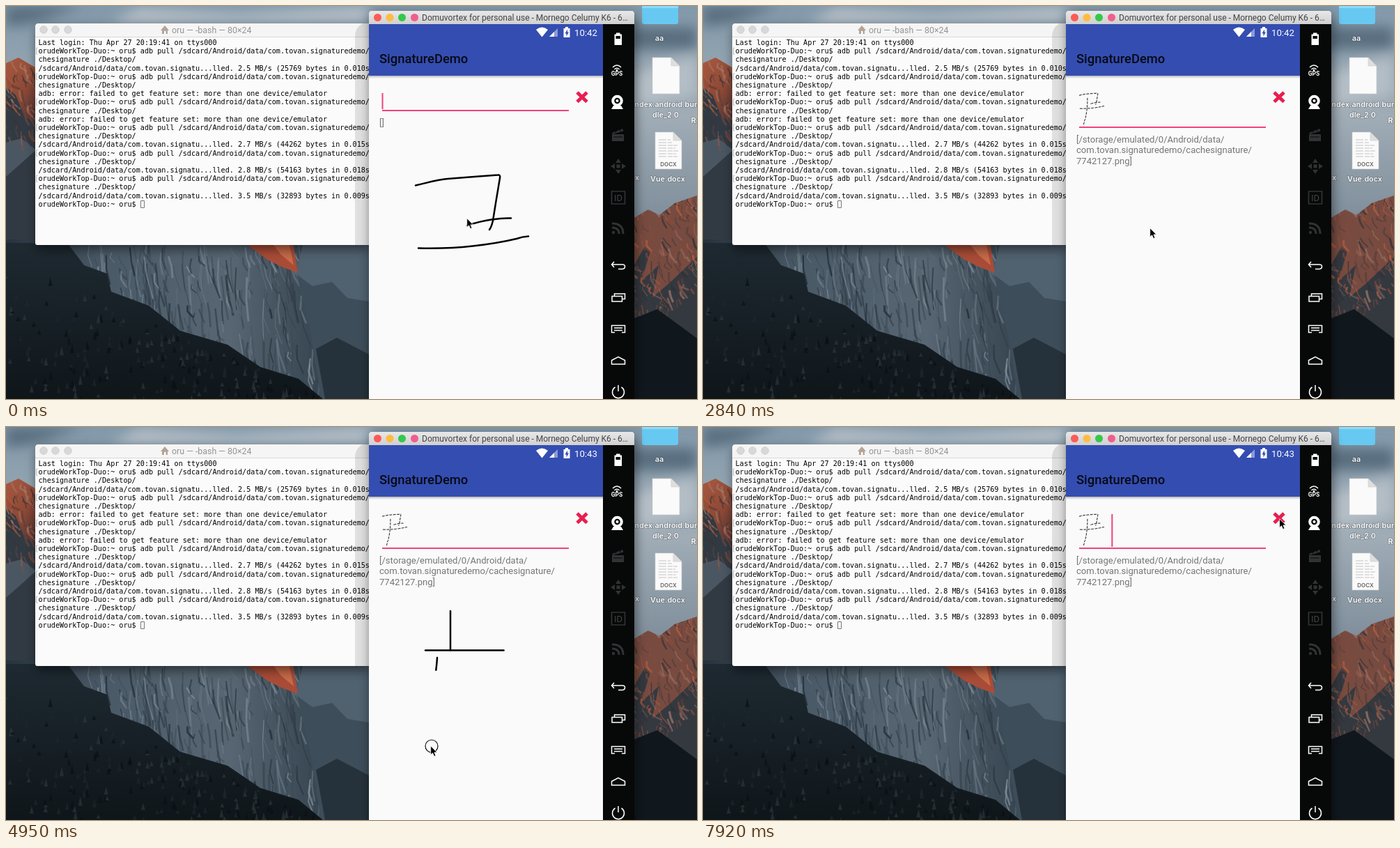
Write an HTML page that moves like this. It is 992 px wide and 564 px high and loops after 8 s.

```html
<!DOCTYPE html>
<html lang="en">
<head>
<meta charset="utf-8">
<title>Handwriting demo</title>
<style>
html, body { margin: 0; width: 100%; height: 100%; overflow: hidden; background: #1b242d; }
svg { display: block; width: 992px; height: 564px; }
text { font-family: Roboto, sans-serif; white-space: pre; }
#terminal text { font: 10.13px "DejaVu Sans Mono", monospace; fill: #000; }
#desktop text { font: 600 10.8px Inter, sans-serif; fill: #fff; text-anchor: middle; paint-order: stroke; stroke: #0005; stroke-width: 1.2px; }
.ink { fill: none; stroke: #000; stroke-width: 2.5; stroke-linecap: round; stroke-linejoin: round; }
.thumb { fill: none; stroke: #000; stroke-width: 4.2; stroke-dasharray: 17 7; }
.line { fill: none; stroke: #fff; stroke-width: 1.5; }
.dim { fill: none; stroke: #303234; stroke-width: 1.7; }
</style>
</head>
<body>
<svg viewBox="0 0 992 564">
<defs>
  <linearGradient id="sky" x2="0" y2="1"><stop stop-color="#8299aa"/><stop offset=".28" stop-color="#a0acb6"/><stop offset=".5" stop-color="#84939f"/><stop offset=".8" stop-color="#5c6b78"/></linearGradient>
  <linearGradient id="cliff"><stop stop-color="#26323d"/><stop offset=".3" stop-color="#4a5966"/><stop offset=".7" stop-color="#576672"/><stop offset="1" stop-color="#35434f"/></linearGradient>
  <linearGradient id="sunlit" x2=".4" y2="1"><stop stop-color="#a9593f"/><stop offset=".55" stop-color="#8c4835"/><stop offset="1" stop-color="#43343a"/></linearGradient>
  <linearGradient id="slope" x2="0" y2="1"><stop stop-color="#1e2931"/><stop offset="1" stop-color="#0f161a"/></linearGradient>
  <linearGradient id="titleBar" x2="0" y2="1"><stop stop-color="#e8e8e8"/><stop offset="1" stop-color="#d0d0d0"/></linearGradient>
  <linearGradient id="fade" x2="0" y2="1"><stop stop-color="#0004"/><stop offset="1" stop-color="#0000"/></linearGradient>
  <filter id="soft" x="-30%" y="-30%" width="160%" height="160%"><feGaussianBlur stdDeviation="9"/></filter>
  <filter id="shadow" x="-10%" y="-10%" width="120%" height="125%"><feDropShadow dy="6" stdDeviation="8" flood-opacity=".5"/></filter>
  <clipPath id="rock"><path d="M105 335H428L416 384 440 460 458 564H150z"/></clipPath>
  <clipPath id="leftRock"><path d="M0 82 18 74 45 90V250H0z"/></clipPath>
  <clipPath id="rightRock"><path d="M900 305 922 292 938 300 960 283 992 272V410L940 452 900 460z"/></clipPath>
  <clipPath id="termClip"><path d="M42 25H521V343H42z"/></clipPath>
  <g id="first">
    <path d="M588 257.5C604 254 617 249.500 634 248S684 244 706 242.500Q710 242 709 247L703 283 699 308Q697 317 694 321"/>
    <path d="M662 315Q680 309 697 306.500T725 304.500"/>
    <path d="M592 347.500Q634 348.500 670 344.500T733 334Q741 331 750 330.500"/>
  </g>
  <path id="down" d="M641.500 275Q642 320 638 355T627 420L621.500 433V438L617 456"/>
  <path id="upright" d="M638 264V320.500"/>
  <path id="across" d="M602 320.500H714.500"/>
  <path id="tail" d="M619 331C618 350 613 375 613 395S612 440 612 460"/>
</defs>

<g id="desktop">
  <path fill="url(#sky)" d="M0 0H992V564H0z"/>
  <g filter="url(#soft)">
    <path fill="#b4bec6" d="M190 2 330 12 520 0 520 24 150 26zM900 96 992 70V128L900 145z"/>
    <path fill="#586d7e" d="M0 0H110L40 24 0 30zM895 30H992V62H895z"/>
  </g>
  <path fill="#4a5763" d="M0 170H45V350H0z"/>
  <path fill="url(#sunlit)" d="M0 82 18 74 45 90V195L24 186 0 192z"/>
  <path fill="#313a43" d="M0 116 14 128 26 158 45 170V208L22 190 0 196zM0 245 45 205V350H0z"/>
  <path fill="#50616f" d="M400 335H525V480H400z"/>
  <path fill="url(#cliff)" d="M105 335H428L416 384 440 460 458 564H0V335z"/>
  <g id="streaks" clip-path="url(#rock)" fill="none"/>
  <path fill="#a94c37" d="M343 340 412 340 419 383 395 374 375 364z"/>
  <path fill="#c76a49" d="M384 343 407 343 413 372 395 357z"/>
  <path fill="#3d4d59" d="M418 386 440 402 468 396 490 419 521 424V564H452L438 475z"/>
  <path fill="url(#slope)" d="M0 340H88L112 372 145 384 151 410 205 430 250 466 318 486 365 518 420 535 455 564H0z"/>
  <path fill="#26323b" d="M445 492 475 476 521 500V564H458z"/>
  <path fill="#784b40" d="M900 305 922 292 938 300 960 283 992 272V410L940 452 900 470z"/>
  <path fill="#343940" d="M900 375 917 345 925 352 912 395 937 372 928 418 952 398 992 360V564H900z"/>
  <g id="rightStreaks" clip-path="url(#rightRock)" fill="none"/>
  <g id="leftStreaks" clip-path="url(#leftRock)" fill="none"/>
  <path fill="#10181e" d="M900 449 935 435 992 477V564H900z"/>
  <g id="trees"/>
  <path fill="#67c9f2" d="M913 0H965V23Q965 26 962 26H916Q913 26 913 23z"/>
  <path fill="#8bdafa" d="M913 0H965V3H913z"/>
  <text x="938" y="50">aa</text>
  <g fill="#fafafa" stroke="#ccc" stroke-width=".6"><path d="M928 74H955L967 86V126H928zM932 181H958L970 193V234H932z"/><path fill="#dedede" d="M955 74V86H967zM958 181V193H970z"/></g>
  <path stroke="#c3c3c3" stroke-dasharray="11 2 7 1" d="M937 192H954M937 196H956M937 200H964M937 204H961M937 208H965M937 212H962M937 216H964"/>
  <text x="951" y="230" style="font-size:8px;fill:#666;stroke:none">DOCX</text>
  <text x="947" y="145">index.android.bun</text>
  <text x="947" y="160">dle_2.0</text>
  <text x="987" y="168">R</text>
  <text x="906" y="250">x</text>
  <text x="950" y="252">Vue.docx</text>
</g>

<g id="terminal">
  <path filter="url(#shadow)" fill="#fbfbfb" d="M42 30Q42 25 47 25H521V343H45Q42 343 42 340z"/>
  <path fill="#f5f5f5" d="M42 30Q42 25 47 25H521V44H42z"/>
  <path stroke="#d9d9d9" d="M42 44.500H521"/>
  <g fill="#d8d8d8" stroke="#c6c6c6" stroke-width=".7"><circle cx="54" cy="34" r="5.300"/><circle cx="71" cy="34" r="5.300"/><circle cx="89" cy="34" r="5.300"/></g>
  <path fill="#b5a497" d="M222 35 228 28 234 35H232V40H224V35z"/><path fill="#fff" d="M227 36H229.500V40H227z"/>
  <text x="238" y="38.500" style="font:12.4px Roboto,sans-serif;fill:#949494">oru — -bash — 80×24</text>
  <g id="lines" clip-path="url(#termClip)"/>
  <path fill="none" stroke="#777" d="M193.500 279.500H198.500V289.500H193.500z"/>
  <path fill="#0000001c" d="M501 44Q501 31 512 25H521V343H501z"/>
</g>

<g id="phone">
  <path filter="url(#shadow)" fill="#fafafa" d="M521 12Q521 7 526 7H897Q902 7 902 12V570H521z"/>
  <path fill="url(#titleBar)" d="M521 12Q521 7 526 7H897Q902 7 902 12V26H521z"/>
  <circle cx="533.500" cy="16.500" r="5.500" fill="#fc5b57"/><circle cx="551" cy="16.500" r="5.500" fill="#fdbc40"/><circle cx="568.500" cy="16.500" r="5.500" fill="#34c84a"/>
  <circle cx="586.500" cy="16.500" r="5.500" fill="#ef5f8d"/>
  <text x="597" y="21" font-size="12" fill="#444">Domuvortex for personal use - Mornego Celumy K6 - 6…</text>
  <path fill="#344db1" d="M521 26H857V100H521z"/>
  <path fill="url(#fade)" d="M521 100H857V104H521z"/>
  <text x="536" y="82" font-size="18.400" font-weight="500" fill="#080a14">SignatureDemo</text>
  <path fill="#fff" d="M761 34Q769.500 27 778 34L769.500 44.500zM800.500 32H803V30H807V32H809.500V45H800.500z"/>
  <path fill="#8d9bd6" d="M780 44 792 32V44z"/><path fill="#fff" d="M780 44 787 37V44z"/>
  <path fill="#344db1" d="M806 33.500 802.500 39.500H804.500V43.500L808 37.500H806z"/>
  <text id="clock" x="816" y="42.500" font-size="13.200" fill="#fff"></text>
  <path stroke="#e91e50" stroke-width="5" d="M820 124 834 137.500M834 124 820 137.500"/>

  <path fill="#070808" d="M857 26H902V564H857z"/>
  <path fill="#fff" d="M876 38.500H881.500V40.500H884V56H873.500V40.500H876z"/><path fill="#070808" d="M875.500 43H882V47H875.500z"/>
  <path class="line" d="M871 88Q877 82 883 88M873.500 91Q877 87.500 880.500 91"/><circle cx="877" cy="92" r="1.200" fill="#fff"/>
  <text x="877" y="100" text-anchor="middle" font-size="8.500" font-weight="700" fill="#fff">GPS</text>
  <circle cx="877.500" cy="136" r="6.300" fill="none" stroke="#fff" stroke-width="4"/><circle cx="877.500" cy="136" r="2" fill="#fff"/><path fill="#fff" d="M872 143H883L886 148H869z"/>
  <path fill="#303234" d="M870 184H887V194H870zM870 182 885 176 886.500 179.500 871 184z"/><path stroke="#070808" d="M875 182 877 177M881 180 883 175M872 188H885"/>
  <path fill="#303234" d="M879 219 883 225H875zM879 241 883 235H875zM868 230 874 226V234zM890 230 884 226V234zM876.500 227.500H881.500V232.500H876.500z"/>
  <path class="dim" d="M869.500 266H888.500V284H869.500z"/><text x="879" y="280" text-anchor="middle" font-size="13" fill="#404244">ID</text>
  <path class="dim" style="stroke-width:3" d="M870 312Q886 312 886 327M870 318Q880 318 880 327"/><circle cx="872" cy="325" r="2.200" fill="#303234"/>
  <path class="line" d="M873 367 869.500 371 873 375M870 371H885Q888.500 371 888.500 374T885 377.500H879"/>
  <path class="line" d="M870 416.500H884.500V424H870zM873.500 416V413H888.500V420.500H885"/>
  <path class="line" d="M874 468.500H869.500V458.500H888.500V468.500H884M873 462H885M873 465.500H885"/>
  <path class="line" d="M869.500 508.500 879 503.500 888.500 508.500V514H869.500z"/>
  <path class="line" d="M874.500 547A8.500 8.500 0 1 0 883.500 547M879 544V553"/>

  <path id="underline" fill="none" stroke="#f0417c" stroke-width="2" d="M540 0H808"/>
  <path id="caret" fill="none" stroke="#f0417c" stroke-width="2"/>
  <g id="paths" font-size="13.050" fill="#757575"></g>
  <g id="thumb1" class="thumb" transform="translate(540 125) scale(.222 .21) translate(-588 -242)"><use href="#first"/><use href="#down"/></g>
  <g id="thumb2" class="thumb" transform="translate(588 125) scale(.222 .23) translate(-602 -264)"><use href="#upright"/><use href="#across"/><use href="#tail"/></g>
  <g id="ink1" class="ink"><use href="#first"/></g>
  <g id="strokes" class="ink"></g>
  <g id="pointer">
    <circle id="ring" cx="2" cy="1" r="9" fill="none" stroke="#111" stroke-width="1.200"/>
    <path transform="translate(.7 .8) scale(.87)" fill="#000" stroke="#fff" stroke-width=".9" d="M0 0V14.500L3.300 11.500 5.700 17 8.300 15.900 6 10.500H10.500z"/>
  </g>
</g>
</svg>
<script>
const LOOP = 8000, STEP = 118.3;
const FIRST_INSERT = 2240, SECOND_INSERT = 6380, DELETE = 7800, CLOCK_TICK = 4600;
const el = id => document.getElementById(id);
const show = (node, on) => node.setAttribute('visibility', on ? 'visible' : 'hidden');
const within = (t, [from, to]) => t >= from && t < to;

function add(parent, tag, attrs, text = '') {
  const node = document.createElementNS('http://www.w3.org/2000/svg', tag);
  for (const key in attrs) node.setAttribute(key, attrs[key]);
  node.textContent = text;
  return parent.appendChild(node);
}

// Rock texture and tree tops
let seed = 11;
const random = (from, to) => from + (to - from) * ((seed = seed * 16807 % 2147483647) / 2147483647);

function streak(id, count, [left, top, right, bottom], length, tones) {
  for (let i = 0; i < count; i++) {
    const size = random(length / 5, length);
    add(el(id), 'path', {
      d: `M${random(left, right)} ${random(top, bottom)}l${random(-3, 5)} ${size / 2} ${random(1, 10)} ${size / 2}`,
      stroke: tones[i % tones.length], 'stroke-width': random(.6, 3.2), opacity: random(.25, .7)
    });
  }
}
const sunlitTones = ['#c0623f', '#3a3338', '#8f4a36', '#2a2e35', '#a57a6c'];
streak('streaks', 330, [120, 335, 450, 540], 65, ['#1c2832', '#2d3a45', '#71808c', '#8d9aa4', '#35444f']);
streak('leftStreaks', 70, [-5, 75, 45, 190], 24, sunlitTones);
streak('rightStreaks', 160, [895, 270, 992, 440], 26, sunlitTones);

for (let i = 0; i < 240; i++) {
  const x = random(0, 450), y = random(355 + x * .45, 575), height = random(5, 14);
  add(el('trees'), 'path', {
    d: `M${x} ${y}l3 ${height}h-6z`, fill: ['#0a1015', '#1c272b', '#2b363a'][i % 3], opacity: .7
  });
}

// Terminal transcript
const prompt = 'orudeWorkTop-Duo:~ oru$ ';
const pulled = (rate, bytes, secs) => `/sdcard/Android/data/com.tovan.signatu...lled. ${rate} MB/s (${bytes} bytes in ${secs}s)`;
const failed = 'adb: error: failed to get feature set: more than one device/emulator';
const results = [pulled(2.5, 25769, '0.010'), failed, failed, pulled(2.7, 44262, '0.015'),
  pulled(2.8, 54163, '0.018'), pulled(3.5, 32893, '0.009')];
const transcript = ['Last login: Thu Apr 27 20:19:41 on ttys000'];
for (const result of results)
  transcript.push(prompt + 'adb pull /sdcard/Android/data/com.tovan.signaturedemo/ca', 'chesignature ./Desktop/', result);
transcript.push(prompt);
transcript.forEach((line, i) => {
  const y = 56 + i * 12.2;
  add(el('lines'), 'text', { x: 46.5, y }, line);
  if (line.includes('adb pull')) add(el('lines'), 'path', { d: `M45.500 ${y - 8}h-2v9h2`, fill: 'none', stroke: '#aaa', 'stroke-width': .8 });
});

// File list under the field
const fileLists = [
  ['[]'],
  ['[/storage/emulated/0/Android/data/', 'com.tovan.signaturedemo/cachesignature/', '7742127.png]'],
  ['[/storage/emulated/0/Android/data/', 'com.tovan.signaturedemo/cachesignature/',
    '7742127.png, /storage/emulated/0/', 'Android/data/com.tovan.signaturedemo/', 'cachesignature/7745836.png]']
];
const listGroups = fileLists.map((lines, n) => {
  const group = add(el('paths'), 'g', {});
  lines.forEach((line, i) => add(group, 'text', { x: 536, y: (n ? 195.5 : 171.5) + i * 15.6 }, line));
  return group;
});

// Strokes: shape, drawing time, time of removal
const strokes = [
  ['down', 300, 1000, FIRST_INSERT],
  ['upright', 3450, 3950, SECOND_INSERT],
  ['across', 4300, 4500, SECOND_INSERT],
  ['tail', 4915, 5300, SECOND_INSERT]
].map(([id, from, to, end]) => {
  const node = add(el('strokes'), 'path', { d: el(id).getAttribute('d'), pathLength: 1 });
  return { node, from, to, end };
});

const pointerKeys = [
  [0, 661, 304], [120, 657, 290], [240, 639, 273], [350, 639, 290], [830, 614, 462], [940, 614, 466],
  [1200, 606, 480], [1660, 600, 495], [1800, 600, 495], [2130, 655, 278], [2250, 658, 300],
  [2370, 650, 316], [2490, 650, 316], [2840, 641, 318], [3080, 638, 290], [3320, 636, 263],
  [3450, 636, 263], [3800, 636, 319], [4020, 600, 319], [4120, 600, 319], [4260, 688, 320],
  [4380, 712, 320], [4620, 616, 330], [4680, 616, 330], [4960, 609, 457], [5080, 609, 457],
  [5180, 612, 452], [5410, 690, 410], [5550, 690, 410], [6270, 814, 136], [6380, 817, 141],
  [6860, 817, 141], [7440, 825, 133], [7690, 825, 133], [7800, 827, 131], [LOOP, 827, 131]
];
const touches = [[240, 940], [3320, 3850], [4120, 4400], [4680, 5100]];

function pointerAt(t) {
  const i = pointerKeys.findIndex(key => key[0] > t);
  const [t0, x0, y0] = pointerKeys[i - 1], [t1, x1, y1] = pointerKeys[i];
  const k = (t - t0) / (t1 - t0);
  return [x0 + (x1 - x0) * k, y0 + (y1 - y0) * k];
}

function draw() {
  const t = Math.floor((performance.now() % LOOP + 24) / STEP) * STEP;
  const count = t < FIRST_INSERT ? 0 : within(t, [SECOND_INSERT, DELETE]) ? 2 : 1;
  const lastEdit = [DELETE, SECOND_INSERT, FIRST_INSERT, 0].find(time => t >= time);

  listGroups.forEach((group, i) => show(group, i === count));
  show(el('thumb1'), count > 0);
  show(el('thumb2'), count > 1);
  show(el('ink1'), t < FIRST_INSERT);
  el('underline').setAttribute('transform', `translate(0 ${count ? 174 : 150})`);
  el('caret').setAttribute('d', `M${540.5 + count * 46.8} 125V${count ? 172 : 148}`);
  show(el('caret'), (t - lastEdit) % 1000 < 500);
  el('clock').textContent = t < CLOCK_TICK ? '10:42' : '10:43';

  for (const { node, from, to, end } of strokes) {
    const done = Math.min(1, (t - from) / (to - from));
    show(node, done > 0 && t < end);
    node.setAttribute('stroke-dasharray', `${Math.max(0, done)} 2`);
  }
  el('pointer').setAttribute('transform', `translate(${pointerAt(t)})`);
  show(el('ring'), touches.some(span => within(t, span)));
  requestAnimationFrame(draw);
}
draw();
</script>
</body>
</html>
```
